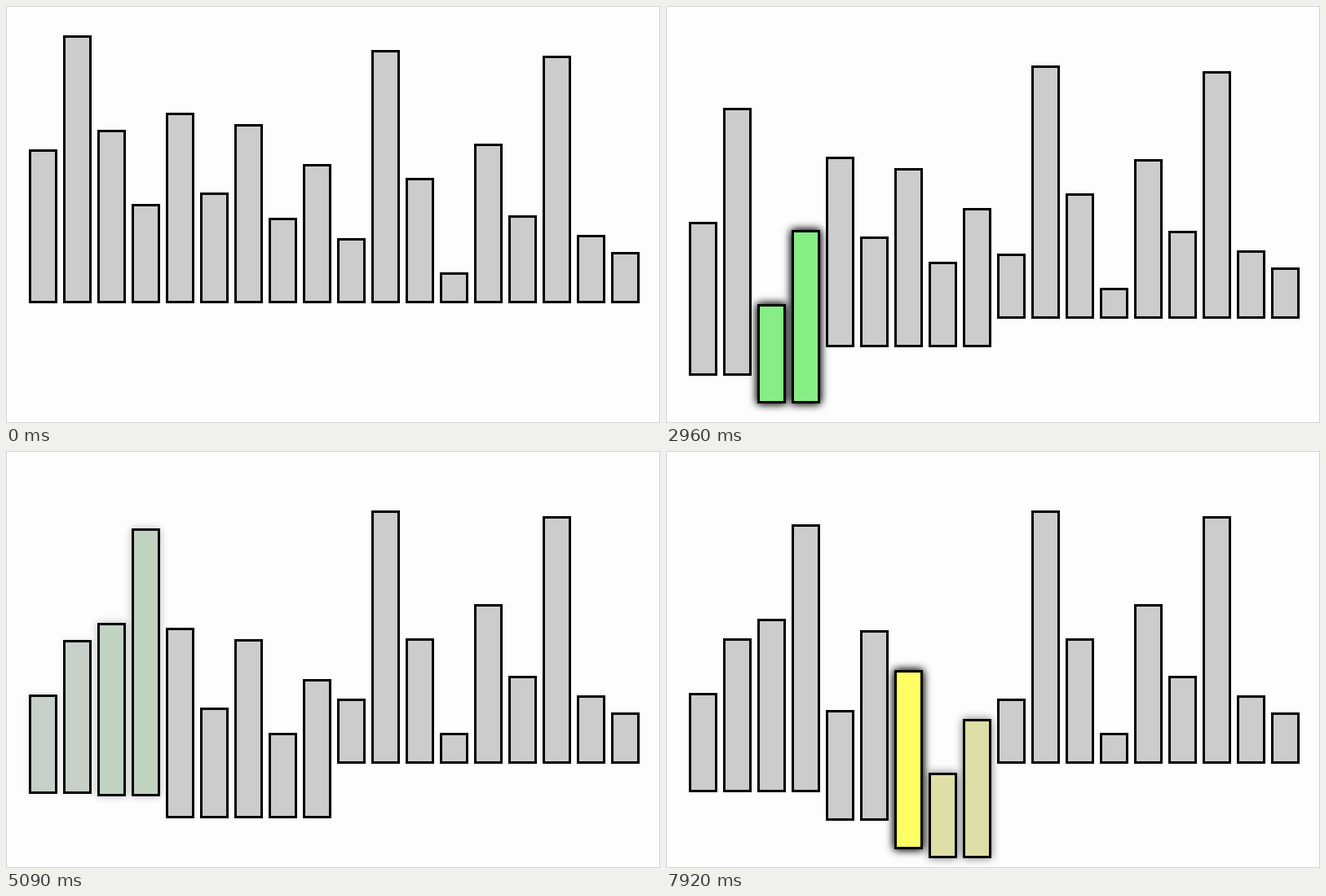
Write an HTML page with a canvas that moves like this. It is 802 by 512 pixels and loops after 8 s.

```html
<!DOCTYPE html>
<html lang="en">
<head>
<meta charset="utf-8">
<title>Merge sort</title>
<style>
  html, body { margin: 0; width: 100%; height: 100%; overflow: hidden; background: #fdfdfd; }
  canvas { display: block; }
</style>
</head>
<body>
<canvas id="stage" width="802" height="512"></canvas>
<script>
const LOOP = 8000, MOVE = 250;
const PITCH = 42, LEFT = 28, WIDTH = 35, STROKE = 3, UNIT = 3.5;
const TOP_LEVEL = 349, LEVEL_STEP = 35;

// red, green, blue, glow
const PLAIN = [204, 204, 204, 0];
const YELLOW = [255, 255, 100, 0.8];
const GREEN = [133, 238, 133, 0.8];

const values = [53, 93, 60, 34, 66, 38, 62, 29, 48, 22, 88, 43, 10, 55, 30, 86, 23, 17];
const bars = values.map((value, i) => ({
  value,
  slot: { start: [i], tweens: [] },
  level: { start: [0], tweens: [] },
  paint: { start: PLAIN, tweens: [] }
}));
const order = [...bars];

function tween(bar, prop, time, to, duration = MOVE) {
  bar[prop].tweens.push({ time, to, duration });
}

// Change level and/or paint of all bars in the slots first..last.
function change(time, first, last, { level, paint }, duration) {
  for (const bar of order.slice(first, last + 1)) {
    if (level !== undefined) tween(bar, 'level', time, [level], duration);
    if (paint) tween(bar, 'paint', time, paint, duration);
  }
}

const accept = (time, slot) => change(time, slot, slot, { paint: GREEN });

// Take the bar out of one slot and push it in before another.
function insert(time, from, to) {
  order.splice(to, 0, ...order.splice(from, 1));
  for (let i = to; i <= from; i++) tween(order[i], 'slot', time, [i]);
  accept(time, to);
}

// Split down to the first pair
change(-119, 0, 17, { level: 1 });
change(231, 0, 8, { level: 2 });
change(581, 0, 3, { level: 3 });
change(931, 0, 1, { level: 4, paint: YELLOW });
accept(1310, 0);
accept(1650, 1);

// Second pair
change(1940, 0, 1, { level: 3, paint: PLAIN });
change(1940, 2, 3, { level: 4, paint: YELLOW });
insert(2280, 3, 2);
accept(2640, 3);

// Merge the first four
change(2950, 0, 3, { level: 3, paint: YELLOW });
insert(3350, 2, 0);
accept(3732, 1);
insert(4130, 3, 2);
accept(4497, 3);
change(4880, 0, 1, { level: 2, paint: PLAIN });
change(4908, 2, 3, { level: 2, paint: PLAIN });

// Third pair
change(4880, 4, 8, { level: 3 });
change(5250, 4, 5, { level: 4, paint: YELLOW });
insert(5630, 5, 4);
accept(6010, 5);

// Last three of the left half
change(6385, 6, 8, { level: 4 });
change(6530, 4, 5, { level: 3, paint: PLAIN });
change(6745, 7, 8, { level: 5, paint: YELLOW });
accept(7105, 7);
accept(7430, 8);
change(7700, 7, 8, { paint: PLAIN }, 110);
change(7700, 6, 6, { paint: YELLOW }, 200);
change(7770, 7, 8, { level: 4 });
change(7820, 7, 8, { paint: YELLOW });

const swing = p => 0.5 - Math.cos(Math.PI * Math.min(1, p)) / 2;

function valueAt({ start, tweens }, time) {
  return tweens.filter(t => t.time <= time).reduce((value, { time: begin, to, duration }) => {
    const p = swing((time - begin) / duration);
    return value.map((v, i) => v + (to[i] - v) * p);
  }, start);
}

function targetSlot({ slot }, time) {
  const begun = slot.tweens.filter(t => t.time <= time);
  return begun.length ? begun[begun.length - 1].to[0] : slot.start[0];
}

const ctx = document.getElementById('stage').getContext('2d');

function drawBar(bar, time) {
  const [slot] = valueAt(bar.slot, time);
  const [level] = valueAt(bar.level, time);
  const [r, g, b, glow] = valueAt(bar.paint, time);
  const height = Math.round(bar.value * UNIT) + STROKE;
  const x = Math.round(LEFT + PITCH * slot);
  const y = Math.floor(TOP_LEVEL + LEVEL_STEP * level) - height;

  // Two passes make the glow dense close to the bar.
  ctx.shadowBlur = 10;
  ctx.shadowColor = `rgba(0, 0, 0, ${glow})`;
  ctx.fillStyle = '#000';
  ctx.fillRect(x, y, WIDTH, height);
  ctx.fillRect(x, y, WIDTH, height);
  ctx.shadowColor = 'transparent';
  ctx.fillStyle = `rgb(${r}, ${g}, ${b})`;
  ctx.fillRect(x + STROKE, y + STROKE, WIDTH - 2 * STROKE, height - 2 * STROKE);
}

function draw(now) {
  const time = now % LOOP;
  ctx.fillStyle = '#fdfdfd';
  ctx.fillRect(0, 0, 802, 512);
  ctx.strokeStyle = '#d3d3d3';
  ctx.strokeRect(0.5, 0.5, 801, 511);
  [...bars]
    .sort((a, b) => targetSlot(a, time) - targetSlot(b, time))
    .forEach(bar => drawBar(bar, time));
  requestAnimationFrame(() => draw(performance.now() - began));
}

const began = performance.now();
draw(0);
</script>
</body>
</html>
```
